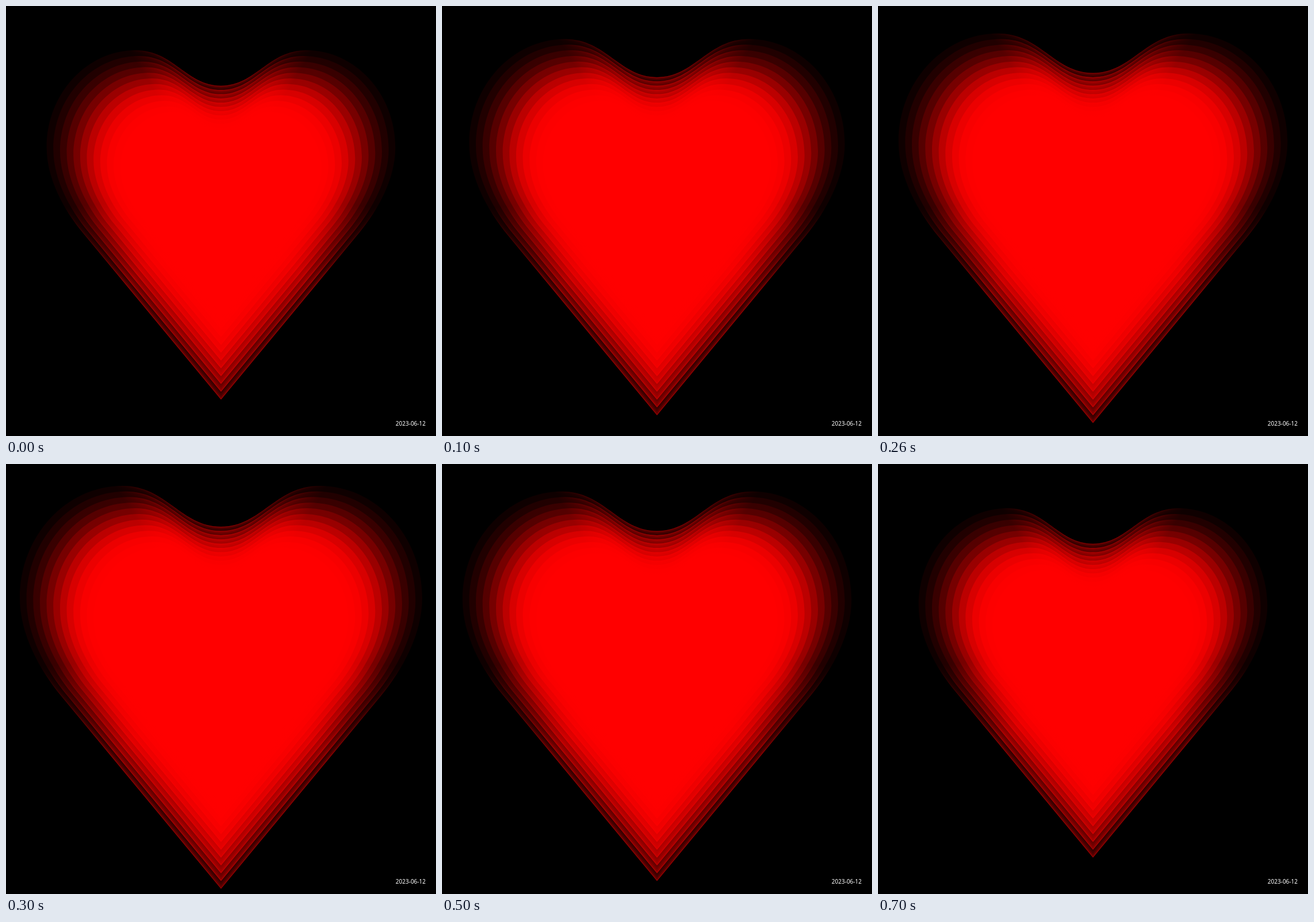
An HTML page with a canvas for the animation above (800 ms loop, 748x748 px).

```html
<!DOCTYPE html>
<html lang="en">
<head>
<meta charset="utf-8">
<title>Beating heart</title>
<style>
  html, body { margin: 0; width: 100%; height: 100%; overflow: hidden; background: #000; }
  canvas { display: block; }
</style>
</head>
<body>
<canvas id="stage" width="748" height="748"></canvas>
<script>
const ctx = document.getElementById('stage').getContext('2d');
const CX = 374, CY = 331;
const STEP = 350 / 30;                              // half-width gained per ring
const BEAT = [26, 28, 29, 30, 30, 29, 28, 26];      // outermost ring, every 100 ms
const BANDS = 11;

const red = a => `rgba(255,0,0,${Math.min(a, 1)})`;

// Outline in units of the half-width; side is 1 or -1
function curve(path, size, side, points) {
  const p = points.map((v, i) => i % 2 ? CY + v * size : CX + side * v * size);
  path.bezierCurveTo(...p);
}

function heart(size) {
  const path = new Path2D();
  path.moveTo(CX, CY - .634 * size);
  curve(path, size, 1, [.2, -.634, .27, -.837, .49, -.837]);
  curve(path, size, 1, [.77, -.837, 1, -.587, 1, -.28]);
  curve(path, size, 1, [1, -.1, .9, .08, .794, .208]);
  path.lineTo(CX, CY + 1.166 * size);
  path.lineTo(CX - .794 * size, CY + .208 * size);
  curve(path, size, -1, [.9, .08, 1, -.1, 1, -.28]);
  curve(path, size, -1, [1, -.587, .77, -.837, .49, -.837]);
  curve(path, size, -1, [.27, -.837, .2, -.634, 0, -.634]);
  path.closePath();
  return path;
}

// Alpha by direction: base on the lobes, plus extra towards the dip and flanks
function around(base, extra) {
  const g = ctx.createConicGradient(-Math.PI / 2, CX, CY);
  const stops = [[0, .85], [.035, .75], [.09, 0], [.26, 0], [.31, .45], [.37, .95], [.5, 1]];
  for (const [at, share] of stops) {
    const color = red(base + extra * share);
    g.addColorStop(at, color);
    g.addColorStop(1 - at, color);
  }
  return g;
}

function drawRing(size, depth) {
  const shape = heart(size);
  ctx.fillStyle = around(.06 + .01 * depth + .006 * depth * depth, .15);
  ctx.fill(shape);
  ctx.save();
  ctx.clip(shape);
  for (const [width, alpha] of [[3, .3], [8, .14], [13, .07]]) {
    ctx.lineWidth = width;
    ctx.strokeStyle = around(0, alpha);
    ctx.stroke(shape);
  }
  ctx.restore();
}

function draw(time) {
  const top = BEAT[Math.floor(time % 800 / 100)];
  ctx.fillStyle = '#000';
  ctx.fillRect(0, 0, 748, 748);
  for (let i = 0; i < BANDS; i++) drawRing((top - i) * STEP, i);
  ctx.fillStyle = '#f00';
  ctx.fill(heart((top - BANDS) * STEP));

  ctx.fillStyle = '#fff';
  ctx.font = '10px "Noto Sans", "Open Sans", sans-serif';
  ctx.textAlign = 'right';
  ctx.fillText('2023-06-12', 730, 730);
}

function tick() {
  draw(performance.now());
  requestAnimationFrame(tick);
}
tick();
</script>
</body>
</html>
```
